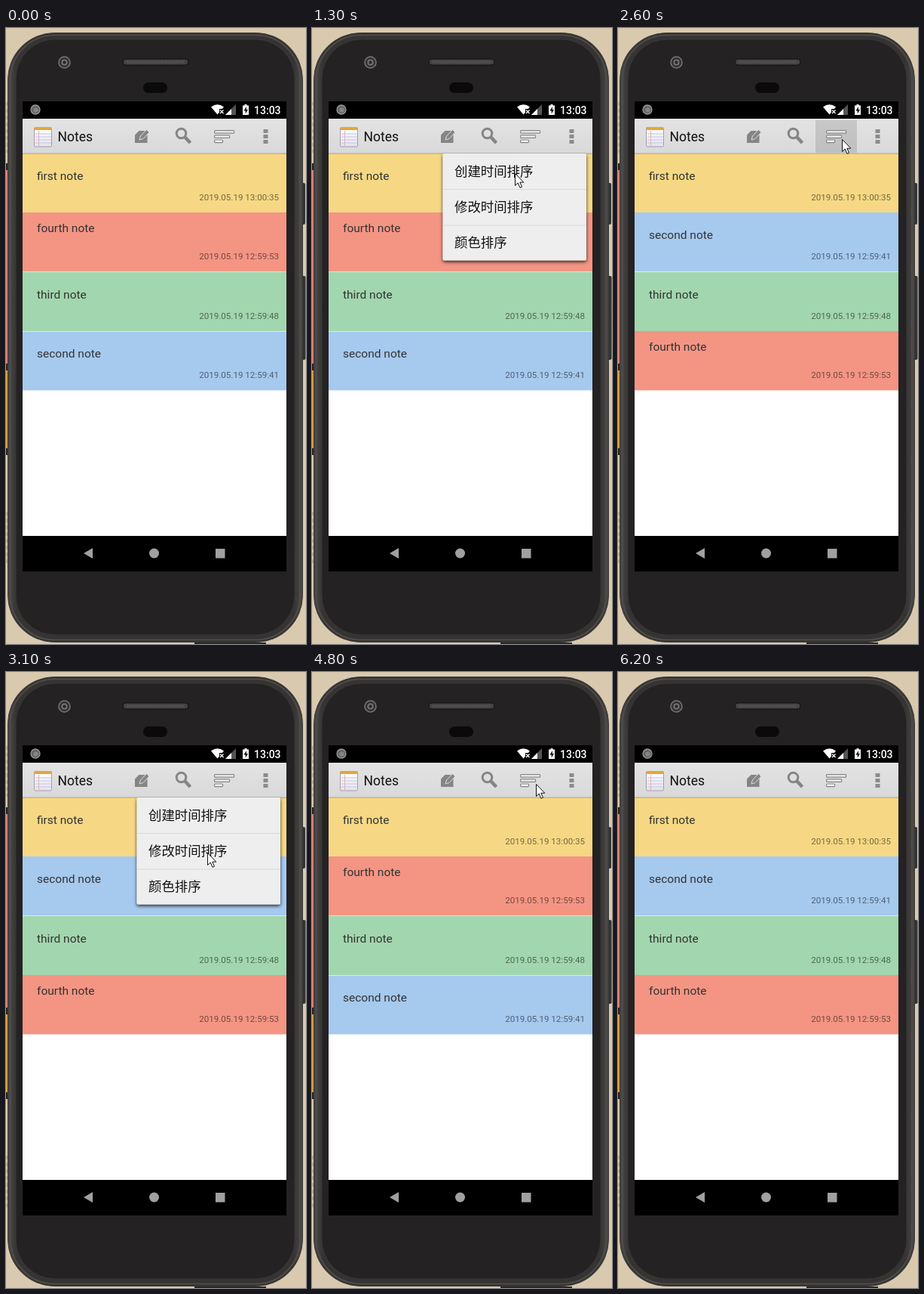
Write an HTML page that moves like this. It is 398 px wide and 815 px high and loops after 6700 ms.

```html
<!DOCTYPE html>
<html lang="en">
<head>
<meta charset="utf-8">
<title>Notes sorting</title>
<style>
  html, body { margin: 0; width: 100%; height: 100%; overflow: hidden; background: #d9caaf; }
  svg { display: block; width: 398px; height: 815px; }
  text { font-family: Roboto, sans-serif; }
  .menu text { font: 17.4px "Noto Sans CJK SC", "Noto Sans CJK", sans-serif; }
</style>
</head>
<body>
<svg viewBox="0 0 398 815">
  <defs>
    <linearGradient id="bar" x2="0" y2="1">
      <stop stop-color="#e3e3e3"/><stop offset="1" stop-color="#d9d9d9"/>
    </linearGradient>
    <linearGradient id="rim" x2="1" y2="0">
      <stop stop-color="#4b4947"/><stop offset=".03" stop-color="#363433"/>
      <stop offset=".97" stop-color="#363433"/><stop offset="1" stop-color="#4b4947"/>
    </linearGradient>
    <linearGradient id="pad" x2="0" y2="1">
      <stop stop-color="#fff"/><stop offset="1" stop-color="#e4e2ee"/>
    </linearGradient>
    <filter id="shadow" x="-10%" y="-10%" width="120%" height="125%">
      <feDropShadow dx="0" dy="2" stdDeviation="2.2" flood-opacity=".8"/>
    </filter>
    <clipPath id="belowBar"><rect x="22" y="165" width="376" height="507"/></clipPath>
  </defs>

  <!-- backdrop -->
  <rect width="398" height="815" fill="#d9caaf"/>
  <path d="M0 187H5V445H0Z" fill="#dc8278"/>
  <path d="M0 452H5V556H0Z" fill="#dba03e"/>
  <path d="M0 179H5V188H0ZM0 444H5V453H0ZM0 556H5V565H0ZM250 813H345V815H250Z" fill="#2a2826"/>
  <path d="M1 98V165M1 640V712" stroke="#a4967e" stroke-dasharray="5 4"/>

  <!-- phone body -->
  <rect x="391" y="205" width="6" height="55" rx="2" fill="#343231"/>
  <rect x="391" y="328" width="6.500" height="111" rx="2" fill="#343231"/>
  <rect x="2.500" y="6.500" width="391" height="806" rx="62" fill="url(#rim)" stroke="#393735"/>
  <rect x="6" y="9.500" width="384" height="800" rx="58.500" fill="none" stroke="#514f4d" stroke-width="1.500"/>
  <rect x="13" y="15" width="370" height="788" rx="52" fill="#242223" stroke="#393737"/>
  <circle cx="77.500" cy="45.500" r="7.500" fill="#343334" stroke="#777" stroke-width="1.500"/>
  <circle cx="77.500" cy="45.500" r="4" fill="#777"/>
  <circle cx="77.500" cy="45.500" r="2.200" fill="#292929"/>
  <rect x="155" y="41" width="87" height="8" rx="4" fill="#444344" stroke="#111"/>
  <path d="M160 45H237" stroke="#585758" stroke-width="3" stroke-dasharray="1.500 1"/>
  <rect x="182" y="72" width="32" height="14" rx="7" fill="#0b0a0b"/>
  <rect x="22" y="97" width="350" height="622"/>

  <!-- status bar -->
  <circle cx="39" cy="108" r="6" fill="#666" stroke="#9a9a9a" stroke-width="1.300"/>
  <circle cx="39.500" cy="108.500" r="3" fill="#858585"/>
  <path d="M272 104.500Q280.500 98 289 104.500L280.500 114.500Z" fill="#fff"/>
  <path d="M283 107H291V115H283Z"/>
  <path d="M284 108.500l4.500 4.500m0-4.500l-4.500 4.500" stroke="#fff" stroke-width="1.400"/>
  <path d="M291 115L305 101V115Z" fill="#555"/>
  <path d="M291 115L299 107V115Z" fill="#fff"/>
  <path d="M314 102.500H316.500V101H319.500V102.500H322V115H314Z" fill="#fff"/>
  <path d="M319 104L315.500 109.500H317.700V113.500L321 108H318.800Z"/>
  <text x="329" y="114" font-size="14" font-weight="500" fill="#fff">13:03</text>

  <!-- list -->
  <rect x="22" y="166" width="350" height="506" fill="#fff"/>
  <g id="list"></g>

  <!-- action bar -->
  <rect x="22" y="120" width="350" height="46" fill="url(#bar)"/>
  <path d="M22 165.500H372" stroke="#c4c4c4"/>
  <path d="M22 166.500H372" stroke="#000" opacity=".15"/>
  <rect id="press" x="262" y="122" width="55" height="43" fill="#000" opacity=".12"/>
  <rect x="37.500" y="131.500" width="23" height="25.500" rx="1.500" fill="url(#pad)" stroke="#a29fae"/>
  <path d="M37.500 135V132.500Q37.500 131 39 131H59Q60.500 131 60.500 132.500V135Z" fill="#e5a637"/>
  <path d="M39 140H60M39 144H60M39 148H60M39 152H60" stroke="#c3c8e2"/>
  <path d="M43.500 136V156.500" stroke="#e9b0b6"/>
  <text x="68.500" y="150" font-size="17.500" fill="#111">Notes</text>
  <path d="M171 141.500L176.500 136H187.500V152H171Z" fill="#858585"/>
  <path d="M177 148L178.500 143L186.500 134.500L190 138L182 146.500Z" fill="#858585" stroke="#dedede"/>
  <circle cx="232.500" cy="139.500" r="6.300" fill="none" stroke="#858585" stroke-width="3"/>
  <path d="M237.500 144.500L244.500 152" stroke="#858585" stroke-width="4.500"/>
  <g fill="#f1f1f1" stroke="#858585" stroke-width="1.200">
    <rect x="276.600" y="135.600" width="26" height="3.600" rx="1"/>
    <rect x="276.600" y="141.800" width="20" height="3.600" rx="1"/>
    <rect x="276.600" y="148" width="11" height="3.600" rx="1"/>
  </g>
  <path d="M341.500 134h6v5h-6zm0 7h6v5h-6zm0 7h6v5h-6z" fill="#8b8b8b"/>

  <!-- navigation bar -->
  <g fill="#a0a0a0">
    <path d="M103 695L115 688V702Z"/>
    <circle cx="196.500" cy="695" r="6.500"/>
    <rect x="278" y="689" width="12.500" height="12.500"/>
  </g>

  <g clip-path="url(#belowBar)">
    <g id="menu" class="menu">
      <rect x="173.500" y="166" width="190.500" height="141.500" rx="2" fill="#eee" filter="url(#shadow)"/>
      <rect id="pressedRow" x="173.500" width="190.500" height="47" fill="#d9d9d9"/>
      <path d="M174 213.500H364M174 261H364" stroke="#d9d9d9"/>
      <g id="labels"></g>
    </g>
  </g>
  <path id="cursor" d="M-.5.500V16.500L3.200 13L6 19.300L8.500 18.200L5.800 12.200H10.800Z" fill="#fff" stroke="#111"/>
</svg>
<script>
const LOOP = 6700, STEP = 100, ROW = 78.5;
const $ = id => document.getElementById(id);

function add(parent, tag, attrs, text = '') {
  const el = document.createElementNS('http://www.w3.org/2000/svg', tag);
  for (const name in attrs) el.setAttribute(name, attrs[name]);
  el.textContent = text;
  return parent.appendChild(el);
}

const notes = [
  ['first note', '13:00:35', '#f6d884', 201],
  ['second note', '12:59:41', '#a6c9ee', 201],
  ['third note', '12:59:48', '#a2d6ae', 201],
  ['fourth note', '12:59:53', '#f49584', 192],
].map(([title, time, color, y]) => {
  const g = add($('list'), 'g', {});
  add(g, 'rect', { x: 22, y: 166, width: 350, height: 79, fill: color });
  add(g, 'path', { d: 'M22 244.500H372', stroke: '#fff', opacity: .6 });
  add(g, 'text', { x: 41, y, 'font-size': 15.5, fill: '#333' }, title);
  add(g, 'text', { x: 362, y: 228, 'font-size': 11.6, 'text-anchor': 'end', opacity: .52 }, '2019.05.19 ' + time);
  return g;
});

['创建时间排序', '修改时间排序', '颜色排序'].forEach((label, i) =>
  add($('labels'), 'text', { x: 189, y: 196 + 47 * i, fill: '#111' }, label));

const byCreation = [0, 1, 2, 3], byChange = [0, 3, 2, 1];

// [time, value] pairs, each value held until the next
const orders = [[0, byChange], [1800, byCreation], [4000, byChange], [5800, byCreation]];
const menuOpen = [
  [0, 0], [1000, .4], [1100, 1], [1700, .7], [1800, .14], [1900, 0],
  [2700, .4], [2800, 1], [3900, .7], [4000, .14], [4100, 0],
  [4900, .4], [5000, 1], [5700, .7], [5800, 0],
];
const pressedRow = [[0, -1], [1700, 0], [1900, -1], [3900, 1], [4100, -1], [5700, 2], [5800, -1]];
const pressTimes = [900, 2600, 4700];

// [time, x, y]
const cursorPath = [
  [200, 340, 174], [400, 308, 154], [600, 285, 141], [800, 298, 148],
  [1000, 298, 148], [1300, 270, 192], [1800, 270, 192], [2200, 298, 147],
  [2700, 298, 147], [3100, 268, 239], [4000, 268, 239], [4500, 298, 148],
  [4900, 298, 148], [5300, 266, 282], [5900, 266, 282], [6000, 312, 212], [6100, 385, 100],
];

const held = (keys, t) => keys.findLast(k => k[0] <= t)[1];

function cursorAt(t) {
  const i = cursorPath.findIndex(k => k[0] >= t);
  if (i < 0 || t < cursorPath[0][0]) return null;
  if (i === 0) return cursorPath[0].slice(1);
  const [t0, x0, y0] = cursorPath[i - 1], [t1, x1, y1] = cursorPath[i];
  const p = (t - t0) / (t1 - t0), e = p * p * (3 - 2 * p);
  return [x0 + (x1 - x0) * e, y0 + (y1 - y0) * e];
}

function show(el, visible) {
  el.style.display = visible ? '' : 'none';
}

function draw(t) {
  held(orders, t).forEach((note, row) =>
    notes[note].setAttribute('transform', `translate(0 ${Math.floor(row * ROW)})`));

  const open = held(menuOpen, t), scale = .9 + .1 * open;
  show($('menu'), open > 0);
  $('menu').setAttribute('opacity', open);
  $('menu').setAttribute('transform', `translate(268.7 166) scale(${scale}) translate(-268.7 -166)`);

  const row = held(pressedRow, t);
  show($('pressedRow'), row >= 0);
  $('pressedRow').setAttribute('y', 166 + 47.2 * Math.max(row, 0));
  show($('press'), pressTimes.includes(t));

  const pos = cursorAt(t);
  show($('cursor'), pos);
  if (pos) $('cursor').setAttribute('transform', `translate(${pos.map(Math.round)})`);
}

function tick() {
  draw(Math.floor(performance.now() % LOOP / STEP) * STEP);
  requestAnimationFrame(tick);
}
tick();
</script>
</body>
</html>
```
